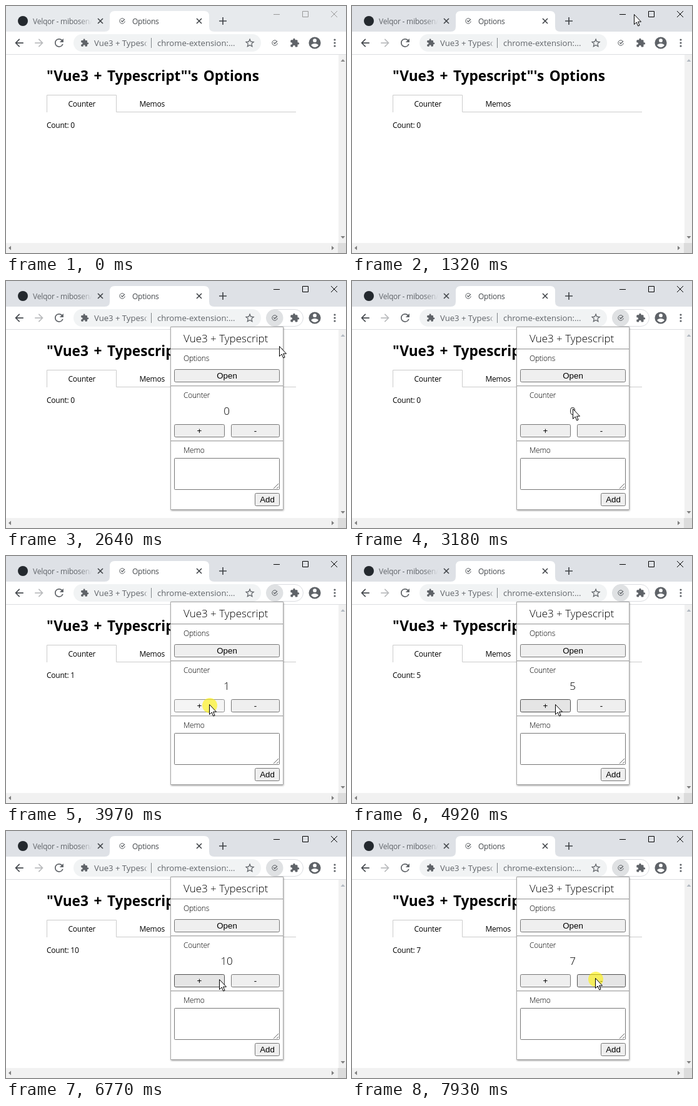
Write an HTML page that moves like this. It is 544 px wide and 395 px high and loops after 8000 ms.

```html
<!DOCTYPE html>
<html lang="en">
<head>
<meta charset="utf-8">
<title>Options</title>
<style>
  html, body { margin: 0; width: 100%; height: 100%; overflow: hidden; background: #fff; }
  svg { display: block; }
  text { font: 12px "Open Sans", "Noto Sans", sans-serif; letter-spacing: -.25px; white-space: pre; }
  .heading { font-size: 22.65px; font-weight: 700; letter-spacing: 0; word-spacing: 2.7px; }
  .url { font-size: 13.1px; letter-spacing: 0; }
  .light { font-weight: 300; }
  .title { font-size: 17px; letter-spacing: 0; }
  .value { font-size: 17px; text-anchor: middle; }
  .button rect { fill: #efefef; stroke: #767676; }
  .button text { font: 13.33px "Liberation Sans", Arial, sans-serif; letter-spacing: 0; text-anchor: middle; }
  .button.hover rect { fill: #e5e5e5; stroke: #4f4f4f; }
  .button.active rect { fill: #f5f5f5; stroke: #8d8d8d; }
  .line { fill: none; stroke: #ccc; }
  .icon { fill: #5f6368; }
  .stroke { fill: none; stroke: #3f4347; stroke-width: 1.6; }
  #strip { fill: #e7eaed; }
  #strip.focused { fill: #dee1e6; }
  #controls { fill: none; stroke: #999; }
  #controls.focused { stroke: #000; }
  #upArrow { fill: #8a8a8a; }
  #upArrow.focused { fill: #b3bac2; }
  #ring { fill: #e8e9eb; }
  #ring.open { fill: #dfe1e3; }
</style>
</head>
<body>
<svg width="544" height="395" viewBox="0 0 544 395">
  <defs>
    <linearGradient id="tabFade" gradientUnits="userSpaceOnUse" x1="116" x2="138" y1="0" y2="0">
      <stop stop-color="#5f6368"/><stop offset="1" stop-color="#5f6368" stop-opacity="0"/>
    </linearGradient>
    <linearGradient id="urlFade" gradientUnits="userSpaceOnUse" x1="221" x2="226" y1="0" y2="0">
      <stop stop-color="#5f6368"/><stop offset="1" stop-color="#5f6368" stop-opacity="0"/>
    </linearGradient>
    <filter id="shadow" x="-10%" y="-10%" width="120%" height="120%">
      <feDropShadow dx="0" dy="1" stdDeviation="1.5" flood-opacity=".45"/>
    </filter>
    <path id="puzzle" d="M20.5 11H19V7c0-1.1-.9-2-2-2h-4V3.5a2.5 2.5 0 0 0-5 0V5H4c-1.1 0-2 .9-2 2v3.8h1.5a2.7 2.7 0 0 1 0 5.4H2V20c0 1.1.9 2 2 2h3.8v-1.5a2.7 2.7 0 0 1 5.4 0V22H17c1.1 0 2-.9 2-2v-4h1.5a2.5 2.5 0 0 0 0-5z"/>
    <path id="arrow" d="M20 11H7.83l5.59-5.59L12 4l-8 8 8 8 1.41-1.41L7.83 13H20z"/>
    <path id="cross" d="M-4-4L4 4M4-4L-4 4"/>
    <g id="check" fill="none" stroke="#45494d">
      <path d="M2.8-3.2A4.2 4.2 0 1 0 4.2.4" stroke-width=".9"/><path d="M-1.8-.6L0 1.2L4-2.8" stroke-width="1.2"/>
    </g>
  </defs>

  <!-- tab strip -->
  <rect id="strip" width="544" height="42"/>
  <path d="M158 41q8 0 8-8V16q0-8 8-8H317q8 0 8 8V33q0 8 8 8z" fill="#fff"/>
  <circle cx="27" cy="24" r="8" fill="#24292e"/>
  <text x="43" y="28.5" fill="url(#tabFade)">Velqor - mibosen/</text>
  <text x="202" y="28.5" fill="#45494d">Options</text>
  <use href="#check" x="186" y="24"/>
  <g class="stroke">
    <use href="#cross" x="151" y="24"/><use href="#cross" x="309" y="24"/>
    <path d="M341 24H353M347 18V30"/>
  </g>
  <g id="controls">
    <path d="M428 13.5H438M474.5 8.5H483.5V17.5H474.5zM520 8L530 18M530 8L520 18"/>
  </g>

  <!-- toolbar -->
  <rect y="41" width="544" height="36" fill="#fff"/>
  <path class="line" d="M0 77.5H544" style="stroke:#dcdee1"/>
  <rect x="108" y="45" width="300" height="28" rx="14" fill="#f1f3f4"/>
  <g class="icon">
    <use href="#arrow" transform="translate(11 49) scale(.84)" fill="#474b50"/>
    <use href="#arrow" transform="translate(63 49) scale(-.84 .84)" fill="#babcbe"/>
    <path transform="translate(74.5 48.5) scale(.87)" d="M17.65 6.35A7.96 7.96 0 0 0 12 4a8 8 0 1 0 7.73 10h-2.08A6 6 0 1 1 12 6c1.66 0 3.14.69 4.22 1.78L13 11h7V4z"/>
    <use href="#puzzle" transform="translate(119 52) scale(.58)"/>
    <path transform="translate(381 50) scale(.76)" d="M22 9.24l-7.19-.62L12 2 9.19 8.63 2 9.24l5.46 4.73L5.82 21 12 17.27 18.18 21l-1.63-7.03zM12 15.4l-3.76 2.27 1-4.28-3.32-2.88 4.38-.38L12 6.1l1.71 4.04 4.38.38-3.32 2.88 1 4.28z"/>
    <path transform="translate(482.5 47.5) scale(.96)" d="M12 2a10 10 0 1 0 0 20 10 10 0 0 0 0-20zm0 3a3 3 0 1 1 0 6 3 3 0 0 1 0-6zm0 14.2a7.2 7.2 0 0 1-6-3.22c.03-1.99 4-3.08 6-3.08s5.97 1.09 6 3.08a7.2 7.2 0 0 1-6 3.22z"/>
    <circle cx="526" cy="54" r="1.6"/><circle cx="526" cy="59" r="1.6"/><circle cx="526" cy="64" r="1.6"/>
  </g>
  <text class="url" x="141" y="64" fill="url(#urlFade)">Vue3 + Typesc</text>
  <path class="line" d="M232.5 51V67" style="stroke:#80868b"/>
  <text class="url" x="242" y="64" fill="#5f6368">chrome-extension:...</text>
  <g id="pill">
    <rect x="416.5" y="45.5" width="59" height="27" rx="13.5" fill="#fff" stroke="#dadce0"/>
    <circle id="ring" cx="430" cy="59" r="13.5"/>
  </g>
  <use href="#check" x="430" y="59"/>
  <use href="#puzzle" class="icon" transform="translate(454 51) scale(.66)"/>

  <!-- page -->
  <text class="heading" x="65" y="120">"Vue3 + Typescript"'s Options</text>
  <path class="line" d="M65.5 170V142.5H176.5V169.5H464"/>
  <text x="99.5" y="161">Counter</text>
  <text x="213.5" y="161">Memos</text>
  <text id="count" x="65" y="195"></text>
  <path d="M532 78H544V379H532zM0 379H531V395H0z" fill="#f1f1f1"/>
  <rect x="531" y="379" width="13" height="16" fill="#dcdcdc"/>
  <path id="upArrow" d="M535.5 89H542.5L539 85z"/>
  <path d="M535.5 368H542.5L539 372zM8 383.5V390.5L4 387zM521 383.5V390.5L525 387z" fill="#7f7f7f"/>

  <!-- popup -->
  <g id="popup">
    <rect x="264" y="73" width="180" height="293" fill="#fff" filter="url(#shadow)"/>
    <path class="line" d="M263.5 73.5H443.5V365.5H263.5zM264 108.5H443M264 167.5H443M264 255.5H443" style="stroke:#a8a8a8"/>
    <path class="line" d="M264 109.5H443M264 168.5H443M264 256.5H443" style="stroke:#e2e2e2"/>
    <text class="light title" x="284" y="98">Vue3 + Typescript</text>
    <text class="light" x="284" y="128">Options</text>
    <text class="light" x="284" y="187">Counter</text>
    <text class="light" x="284" y="275">Memo</text>
    <text class="light value" id="value" x="353" y="214"></text>
    <g id="buttons"></g>
    <rect x="269.5" y="283.5" width="168" height="50" rx="1" fill="#fff" stroke="#767676"/>
    <path class="line" d="M428 332L436 324M433 332L436 329" style="stroke:#666"/>
  </g>

  <circle id="halo" r="12" fill="#fff200" fill-opacity=".6"/>
  <path id="cursor" d="M-.5-.5V15.5L3.2 12L5.7 18L8.1 17L5.6 11.2H10.5z" fill="#fff" stroke="#000"/>
</svg>
<script>
const LOOP = 8000, FOCUS = 1090, POPUP = 2260, MINUS_FROM = 6770;
const $ = id => document.getElementById(id);
const show = (el, on) => el.setAttribute("visibility", on ? "visible" : "hidden");

// label, x, y, width
const buttons = [["Open", 269, 141, 169], ["+", 269, 229, 81], ["-", 360, 229, 78], ["Add", 398, 339, 40]]
  .map(([label, x, y, w]) => {
    $("buttons").insertAdjacentHTML("beforeend", `<g class="button">
      <rect x="${x + .5}" y="${y + .5}" width="${w - 1}" height="20" rx="2"/>
      <text x="${x + w / 2}" y="${y + 15}">${label}</text></g>`);
    return { label, x, y, w, el: $("buttons").lastElementChild };
  });

// first step, last step, number of steps, destination
const moves = [
  [1090, 1700, 9, 430, 62],
  [2420, 2640, 4, 438, 105],
  [2720, 3260, 8, 326, 238],
  [6770, 7000, 4, 390, 236],
];
// mouse down, mouse up; the first one opens the popup
const clicks = [
  [1930, 2010], [3580, 3650], [3970, 4050], [4200, 4370], [4520, 4670],
  [4840, 4920], [5140, 5220], [5390, 5540], [5690, 5770], [6000, 6080],
  [6230, 6310], [7170, 7240], [7470, 7550], [7700, 7780], [7930, 8010],
];

function cursorAt(t) {
  let x = 470, y = -25;
  for (const [start, end, steps, toX, toY] of moves) {
    if (t < start) break;
    const step = Math.floor((t - start) / (end - start) * (steps - 1) + 1e-6) + 1;
    const p = Math.min(step / steps, 1);
    x += (toX - x) * p;
    y += (toY - y) * p;
  }
  return [Math.round(x), Math.round(y)];
}

function draw(t) {
  const [x, y] = cursorAt(t);
  const pressed = clicks.some(([down, up]) => t >= down && t < up);
  const count = clicks.slice(1).filter(([, up]) => t >= up)
    .reduce((n, [, up]) => n + (up < MINUS_FROM ? 1 : -1), 0);

  $("count").textContent = "Count: " + count;
  $("value").textContent = count;
  for (const id of ["strip", "controls", "upArrow"]) $(id).classList.toggle("focused", t >= FOCUS);
  show($("pill"), t >= POPUP || (x > 415 && x < 476 && y > 44 && y < 73));
  $("ring").classList.toggle("open", t >= POPUP);
  show($("popup"), t >= POPUP);
  for (const b of buttons) {
    const hover = x >= b.x && x < b.x + b.w && y >= b.y && y < b.y + 21;
    b.el.classList.toggle("hover", hover);
    b.el.classList.toggle("active", hover && pressed && b.label === "+");
  }
  show($("halo"), pressed);
  $("halo").setAttribute("transform", `translate(${x} ${y + 1})`);
  $("cursor").setAttribute("transform", `translate(${x} ${y})`);
}

function tick() {
  draw(performance.now() % LOOP);
  requestAnimationFrame(tick);
}
tick();
</script>
</body>
</html>
```
